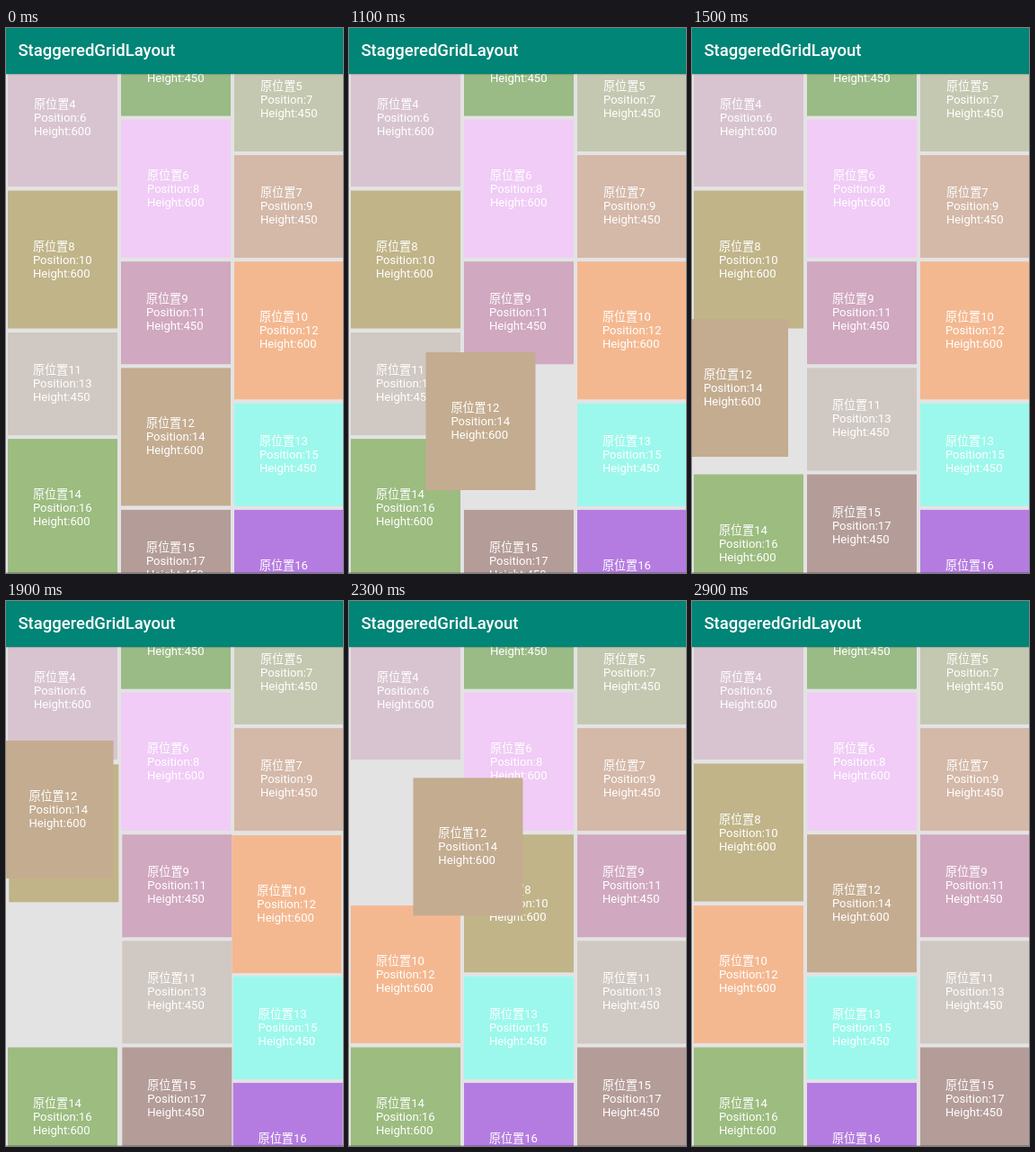
Recreate the animation shown at these times as an HTML page. Size 375x605 px, loop 3 s.

```html
<!DOCTYPE html>
<html lang="zh-CN">
<head>
<meta charset="utf-8">
<title>StaggeredGridLayout</title>
<style>
html, body { margin: 0; width: 100%; height: 100%; overflow: hidden; }
#stage {
  position: relative; width: 375px; height: 605px; overflow: hidden;
  background: #e3e3e3; color: #fff;
  font-family: Roboto, "Noto Sans CJK SC", "Noto Sans CJK", sans-serif;
}
header {
  position: absolute; z-index: 3; left: 0; top: 0; width: 375px; height: 51px;
  box-sizing: border-box; padding-left: 13.4px;
  background: #008577; box-shadow: 0 1px 1px rgba(0, 0, 0, .15);
  font-size: 18.5px; font-weight: 500; line-height: 51px;
}
.card {
  position: absolute; left: 0; top: 0; width: 121.5px;
  display: flex; align-items: center; justify-content: center;
  font-size: 13.1px; line-height: 15px; white-space: pre;
}
.dragged { z-index: 2; }
#edge {
  position: absolute; z-index: 4; left: 0; bottom: 0; width: 375px; height: 1px;
  background: rgba(0, 0, 0, .2);
}
</style>
</head>
<body>
<div id="stage">
  <header>StaggeredGridLayout</header>
  <div id="edge"></div>
</div>
<script>
const LOOP = 3000, STEP = 100, MOVE = 230;
const FIRST = 3, DRAGGED = 12;
const UNIT = 39.375, GAP = 4.6;

const colors = [
  '#9aba86', '#d8c4d0', '#c4c8b0', '#f0ccf6', '#d4b8a8', '#c0b488', '#d0a8c0',
  '#f4b890', '#d0c8c2', '#c4ac90', '#9cf8ec', '#9cbc80', '#b49c98', '#b47ce0'
];
const ids = colors.map((_, i) => FIRST + i);

// Odd cards are three units tall, even ones four
const units = id => id % 2 ? 3 : 4;

// Each card goes to the shortest column; returns id -> [x, y]
function layout(order) {
  const ends = [0, -1, 0], slots = {};
  for (const id of order) {
    const col = ends.indexOf(Math.min(...ends));
    slots[id] = [2 + 126 * col, 23 + UNIT * ends[col]];
    ends[col] += units(id);
  }
  return slots;
}

function dropBefore(next) {
  const order = ids.filter(id => id !== DRAGGED);
  order.splice(order.indexOf(next), 0, DRAGGED);
  return layout(order);
}

const home = layout(ids);
const moves = [
  { at: 1270, slots: dropBefore(11) },
  { at: 1885, slots: dropBefore(8) },
  { at: 2440, slots: dropBefore(9) }
];

// Drag path: time, x, y
const path = [
  [780, ...home[DRAGGED]],
  [1100, 85.5, 360], [1300, 4, 333], [1500, -15, 323],
  [1900, -2.5, 155], [2100, 2, 144.5], [2500, 137, 250],
  [2750, ...moves[2].slots[DRAGGED]]
];

const mix = (a, b, p) => a + (b - a) * p;
const ease = p => .5 - .5 * Math.cos(Math.PI * Math.min(1, Math.max(0, p)));

function slope(i, k) {
  const a = path[i - 1], b = path[i + 1];
  return a && b ? (b[k] - a[k]) / (b[0] - a[0]) : 0;
}

// Cubic Hermite curve through the path points
function dragPos(time) {
  const end = path[path.length - 1][0];
  const t = Math.min(end, Math.max(path[0][0], time));
  const i = path.findIndex(p => p[0] >= t && p !== path[0]) - 1;
  const a = path[i], b = path[i + 1], span = b[0] - a[0];
  const u = (t - a[0]) / span, v = 1 - u;
  return [1, 2].map(k =>
    v * v * (1 + 2 * u) * a[k] + u * u * (3 - 2 * u) * b[k] +
    span * u * v * (v * slope(i, k) - u * slope(i + 1, k)));
}

function slotPos(id, t) {
  return moves.reduce((pos, { at, slots }) => {
    const p = ease((t - at) / MOVE);
    return pos.map((v, k) => mix(v, slots[id][k], p));
  }, home[id]);
}

const stage = document.getElementById('stage');
const views = ids.map((id, i) => {
  const el = document.createElement('div');
  const label = document.createElement('span');
  el.className = id === DRAGGED ? 'card dragged' : 'card';
  el.style.height = units(id) * UNIT - GAP + 'px';
  el.style.background = colors[i];
  label.textContent = `原位置${id}\nPosition:${id + 2}\nHeight:${units(id) * 150}`;
  el.append(label);
  stage.append(el);
  return { id, el };
});

function render(t) {
  for (const { id, el } of views) {
    const [x, y] = id === DRAGGED ? dragPos(t) : slotPos(id, t);
    el.style.transform = `translate(${x}px, ${y}px)`;
  }
}

const start = performance.now();
function tick() {
  const t = (performance.now() - start) % LOOP;
  render(Math.floor(t / STEP) * STEP);
  requestAnimationFrame(tick);
}
tick();
</script>
</body>
</html>
```
